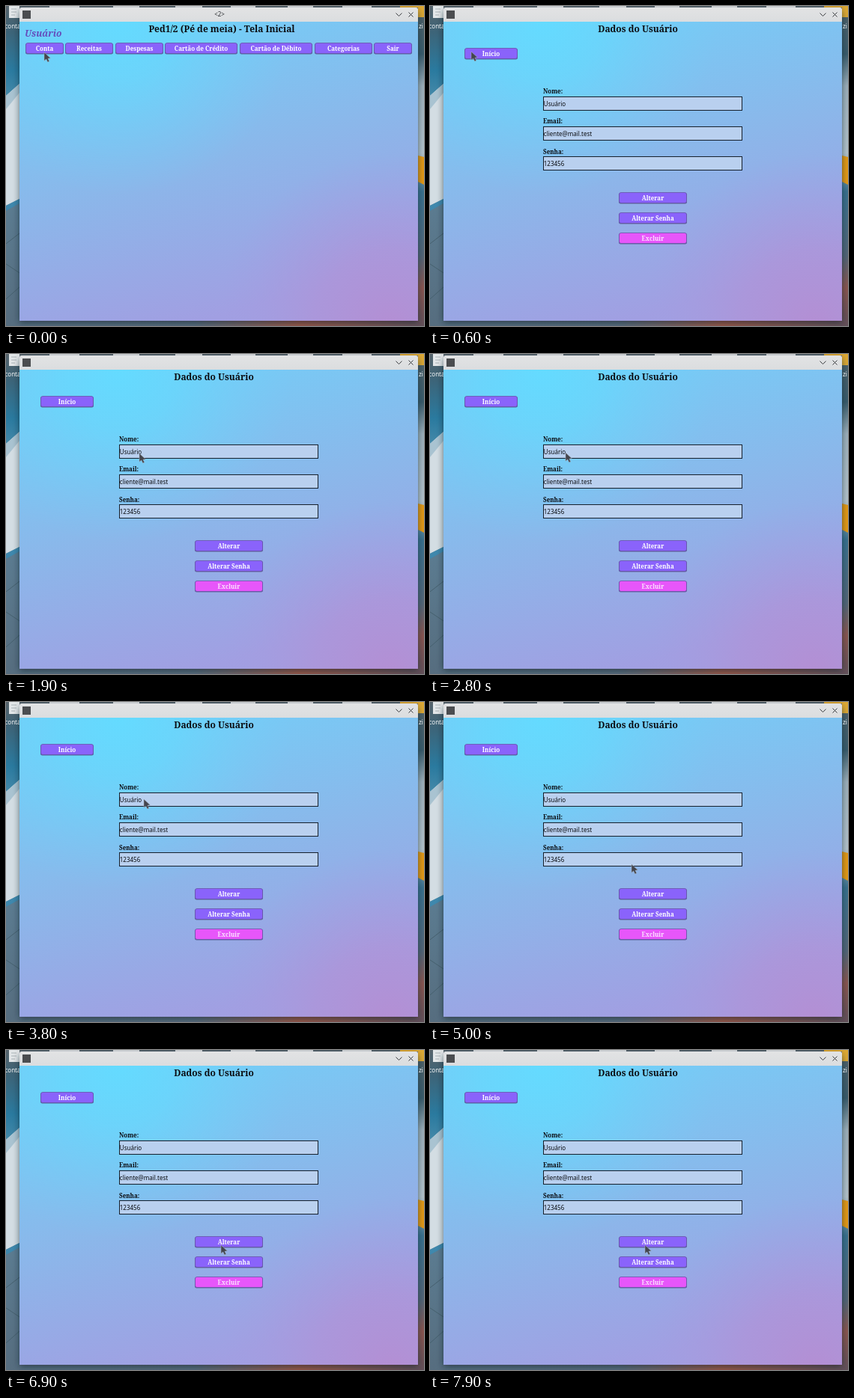
These frames come from a looping animation (558 by 428 pixels, 8 s). An HTML page:

```html
<!DOCTYPE html>
<html lang="pt-BR">
<head>
<meta charset="utf-8">
<title>Tela Inicial</title>
<style>
html, body { margin: 0; width: 100%; height: 100%; overflow: hidden; background: #34566f; }
svg { display: block; width: 558px; height: 428px; }
text { font: 8px "Noto Sans", sans-serif; }
.serif { font: bold 8px "Noto Serif", serif; }
.title { font: bold 12px "Noto Serif", serif; }
.user { font: italic bold 12px "Noto Serif", serif; fill: #654bbb; }
.mid { text-anchor: middle; }
</style>
</head>
<body>
<svg viewBox="0 0 558 428">
  <defs>
    <linearGradient id="left" x2="0" y2="1">
      <stop offset="0" stop-color="#56646c"/><stop offset=".08" stop-color="#3d6478"/>
      <stop offset=".2" stop-color="#2a7a9f"/><stop offset=".3" stop-color="#4a8cab"/>
      <stop offset=".63" stop-color="#5b7b90"/><stop offset="1" stop-color="#566d7f"/>
    </linearGradient>
    <linearGradient id="right" x2="0" y2="1">
      <stop offset="0" stop-color="#52636b"/><stop offset=".15" stop-color="#3a5d6d"/>
      <stop offset=".25" stop-color="#9db1bc"/><stop offset=".46" stop-color="#b4c4cd"/>
      <stop offset=".58" stop-color="#3a7290"/><stop offset=".78" stop-color="#536678"/>
      <stop offset=".88" stop-color="#8a5751"/><stop offset="1" stop-color="#62505a"/>
    </linearGradient>
    <linearGradient id="bottom">
      <stop offset="0" stop-color="#566d7f"/><stop offset=".45" stop-color="#586b7c"/>
      <stop offset=".7" stop-color="#96584a"/><stop offset="1" stop-color="#62505a"/>
    </linearGradient>
    <linearGradient id="bar" x2="0" y2="1">
      <stop offset="0" stop-color="#e2e3e4"/><stop offset="1" stop-color="#dbdddf"/>
    </linearGradient>
    <linearGradient id="base" gradientUnits="userSpaceOnUse" x1="195" y1="21" x2="300" y2="410">
      <stop offset="0" stop-color="#74cdf7"/><stop offset=".5" stop-color="#8bb7ea"/>
      <stop offset="1" stop-color="#a19fe2"/>
    </linearGradient>
    <radialGradient id="cyan" gradientUnits="userSpaceOnUse" cx="150" cy="18" r="235">
      <stop offset="0" stop-color="#64dbff"/><stop offset=".35" stop-color="#67d8fd" stop-opacity=".75"/>
      <stop offset="1" stop-color="#74cdf7" stop-opacity="0"/>
    </radialGradient>
    <radialGradient id="pink" gradientUnits="userSpaceOnUse" cx="515" cy="432" r="235">
      <stop offset="0" stop-color="#b48ed3"/><stop offset=".45" stop-color="#ad95d9" stop-opacity=".8"/>
      <stop offset="1" stop-color="#a19fe2" stop-opacity="0"/>
    </radialGradient>
    <filter id="blur" x="-10%" y="-10%" width="120%" height="120%"><feGaussianBlur stdDeviation="4"/></filter>
  </defs>

  <g id="desktop">
    <rect width="558" height="428" fill="url(#bottom)"/>
    <rect width="20" height="428" fill="url(#left)"/>
    <rect x="548" width="10" height="428" fill="url(#right)"/>
    <rect width="558" height="3" fill="#56646c"/>
    <path d="M0 120L18 104V258L0 267Z" fill="#d3dde3"/>
    <path d="M0 120L18 104V116L0 138Z" fill="#a9c3d1"/>
    <path d="M0 267L18 258V264L0 274Z" fill="#3f88ad"/>
    <path d="M0 318L18 304M0 345L18 357M0 392L18 376" stroke="#46606f" fill="none"/>
    <path d="M550 200L558 202V239L550 235Z" fill="#e39a18"/>
    <path d="M4 0H18V16H4Z" fill="#e3e7e9"/>
    <path d="M7 4H14M7 8H14M7 12H12" stroke="#a9b1b5"/>
    <path d="M58 0H98V2H58ZM143 0H178V2H143ZM226 0H262V2H226ZM300 0H333V2H300ZM376 0H410V2H376ZM449 0H488V2H449Z" fill="#d8dcde"/>
    <path d="M526 0H558V15H550V2H526Z" fill="#dca835"/>
  </g>

  <rect x="18" y="6" width="532" height="417" fill="#101c28" opacity=".6" filter="url(#blur)"/>
  <text x="-1.5" y="30" fill="#f4f7f8">conta</text>
  <text x="551" y="30" fill="#f4f7f8">zi</text>
  <path d="M18 21V5Q18 2 21 2H547Q550 2 550 5V21Z" fill="url(#bar)"/>
  <g id="panel"></g>
  <rect x="22" y="6" width="11" height="11" fill="#4b4d50"/>
  <path d="M520.5 9.5L524.5 13.5L528.5 9.5M537.5 8.5L543.5 14.5M543.5 8.5L537.5 14.5" stroke="#3a3d40" fill="none"/>
  <g id="home"></g>
  <g id="account"></g>
  <path id="cursor" d="M0 0V11.2L2.7 9L4.7 13L6.8 12L5 8.3L8.4 7.8Z" fill="#44454d" stroke="#a8b6c4" stroke-width=".5"/>
</svg>
<script>
const $ = id => document.getElementById(id);
const LOOP = 8000, STEP = 100, OPEN = 500;

const text = (x, y, str, cls = "", fill = "#0b0d12") =>
  `<text x="${x}" y="${y}" class="${cls}" fill="${fill}">${str}</text>`;

const button = (x, y, w, label, fill = "#8a63fb", ink = "#fff") =>
  `<rect x="${x}" y="${y + 1}" width="${w}" height="14.5" rx="2.5" fill="#4b4680" opacity=".8"/>
   <rect x="${x + .5}" y="${y + .5}" width="${w - 1}" height="14" rx="2.5" fill="${fill}" stroke="#6856a8" stroke-width=".8"/>` +
  text(x + w / 2, y + 10.6, label, "serif mid", ink);

const field = (y, label, value, labelY) =>
  text(151, labelY, label, "serif") +
  `<rect x="151.5" y="${y + .5}" width="265" height="18" fill="#b9d0ef" stroke="#16202c"/>` +
  text(151.8, y + 12.6, value);

$("panel").innerHTML = ["base", "cyan", "pink"].map(id =>
  `<rect x="18" y="21" width="532" height="400" fill="url(#${id})"/>`).join("");

const menu = [
  [26, 51, "Conta"], [79, 64, "Receitas"], [146, 64, "Despesas"],
  [212, 97, "Cartão de Crédito"], [312, 97, "Cartão de Débito"],
  [412, 77, "Categorias"], [491, 51, "Sair"]
];

$("home").innerHTML =
  text(285, 14, "&lt;2&gt;", "mid", "#303336") +
  text(288, 34.5, "Ped1/2 (Pé de meia) - Tela Inicial", "title mid") +
  text(25, 41, "Usuário", "user") +
  menu.map(([x, w, label]) => button(x, 49, w, label)).join("");

$("account").innerHTML =
  text(277.5, 34.5, "Dados do Usuário", "title mid") +
  button(46, 56, 71, "Início") +
  field(121, "Nome:", "Usuário", 117) +
  field(161, "Email:", "cliente@mail.test", 157) +
  field(201, "Senha:", "123456", 198) +
  button(252, 249, 91, "Alterar") +
  button(252, 276, 91, "Alterar Senha") +
  button(252, 303, 91, "Excluir", "#e756fa", "#fde4ff");

// time, x, y of the pointer tip
const path = [
  [0, 51, 62], [500, 51, 62], [900, 75, 55], [1100, 78, 57], [1800, 178, 133],
  [2600, 178, 133], [3000, 184, 130], [4000, 184, 130],
  [5000, 269, 217], [6000, 287, 261], [LOOP, 287, 261]
];
const ease = p => p * p * (3 - 2 * p);

function pointerAt(t) {
  const i = path.findIndex(k => k[0] > t);
  const [t0, x0, y0] = path[i - 1], [t1, x1, y1] = path[i];
  const p = ease((t - t0) / (t1 - t0));
  return [x0 + (x1 - x0) * p, y0 + (y1 - y0) * p];
}

const start = performance.now();
function draw() {
  const now = Math.max(0, performance.now() - start) % LOOP;
  const t = Math.floor(now / STEP) * STEP;
  const [x, y] = pointerAt(t);
  $("home").style.display = t < OPEN ? "" : "none";
  $("account").style.display = t < OPEN ? "none" : "";
  $("cursor").setAttribute("transform", `translate(${Math.round(x)} ${Math.round(y)})`);
  requestAnimationFrame(draw);
}
draw();
</script>
</body>
</html>
```
